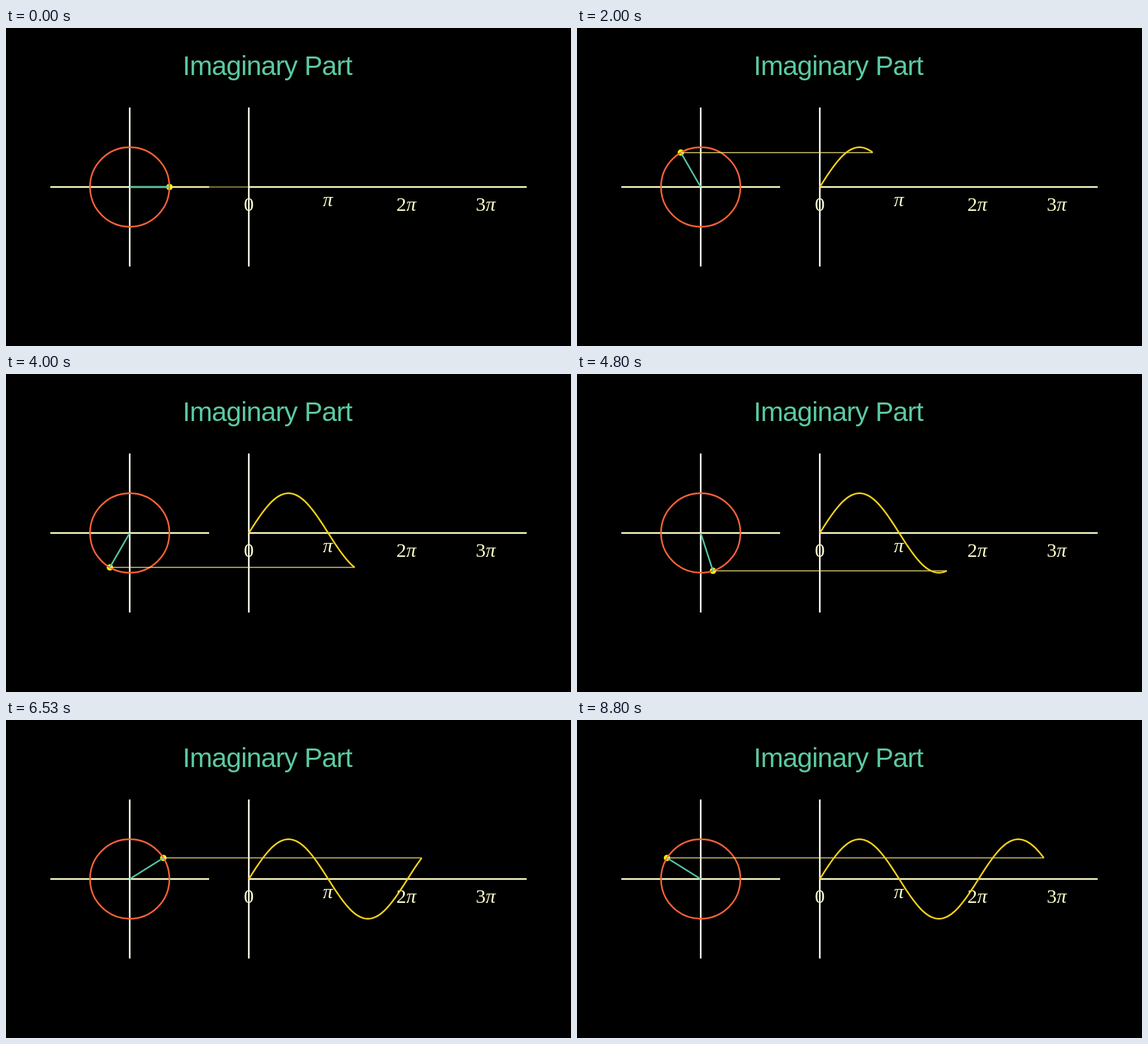
An HTML page for the animation above (9540 ms loop, 854 by 480 pixels).

```html
<!DOCTYPE html>
<html lang="en">
<head>
<meta charset="utf-8">
<title>Imaginary Part</title>
<style>
  html, body { margin: 0; width: 100%; height: 100%; overflow: hidden; background: #000; }
  svg { display: block; width: 854px; height: 480px; }
  .shape { fill: none; stroke-width: 2.4; }
  .title { font: 41px "Liberation Sans", Arial, sans-serif; letter-spacing: -0.75px; fill: #5bcaa0; }
  .label { font: 30px "Liberation Serif", "Times New Roman", serif; fill: #ffffca; }
  .pi { font-style: italic; }
</style>
</head>
<body>
<svg viewBox="0 0 854 480">
  <text class="title" x="267" y="70.5">Imaginary Part</text>
  <g class="shape">
    <path stroke="#ffffc4" d="M67 240H307M367 240H787"/>
    <path stroke="#fffff4" d="M187 120V360M367 120V360"/>
  </g>
  <g class="label">
    <text x="359.5" y="275.5">0</text>
    <text class="pi" x="479" y="268.5">π</text>
    <text x="590" y="275.5">2<tspan class="pi">π</tspan></text>
    <text x="710" y="275.5">3<tspan class="pi">π</tspan></text>
  </g>
  <circle id="dot" r="4.8" fill="#ffff00"/>
  <circle class="shape" cx="187" cy="240" r="60" stroke="#fc6238"/>
  <path id="radius" class="shape" stroke="#55c6a2"/>
  <path id="link" fill="none" stroke="#fff080" stroke-width="1.2"/>
  <path id="wave" class="shape" stroke="#f4d31c"/>
</svg>
<script>
  const LOOP = 9540, FPS = 15, LAST_STEP = 127;
  const CENTER = 187, AXIS_Y = 240, R = 60, WAVE_X = 367;
  const PX_PER_STEP = 40 / FPS, ANGLE_PER_STEP = Math.PI / 3 / FPS;
  const [dot, radius, link, wave] =
    ["dot", "radius", "link", "wave"].map(id => document.getElementById(id));

  const waveX = step => WAVE_X + step * PX_PER_STEP;
  const waveY = step => AXIS_Y - R * Math.sin(step * ANGLE_PER_STEP);

  // Steps run at 15 per second, with delays rounded to 10 ms.
  function stepAt(ms) {
    const tick = Math.floor(ms / 10) * 10;
    return Math.min(LAST_STEP, Math.floor((tick + 3.4) * FPS / 1000));
  }

  function render(ms) {
    const step = stepAt(ms);
    const x = CENTER + R * Math.cos(step * ANGLE_PER_STEP);
    const y = waveY(step);
    const points = Array.from({ length: step + 1 }, (_, i) => `${waveX(i)} ${waveY(i)}`);
    dot.setAttribute("cx", x);
    dot.setAttribute("cy", y);
    radius.setAttribute("d", `M${CENTER} ${AXIS_Y}L${x} ${y}`);
    link.setAttribute("d", `M${x} ${y}H${waveX(step)}`);
    wave.setAttribute("d", "M" + points.join("L"));
  }

  const start = performance.now();
  function loop() {
    render((performance.now() - start) % LOOP);
    requestAnimationFrame(loop);
  }
  loop();
</script>
</body>
</html>
```
